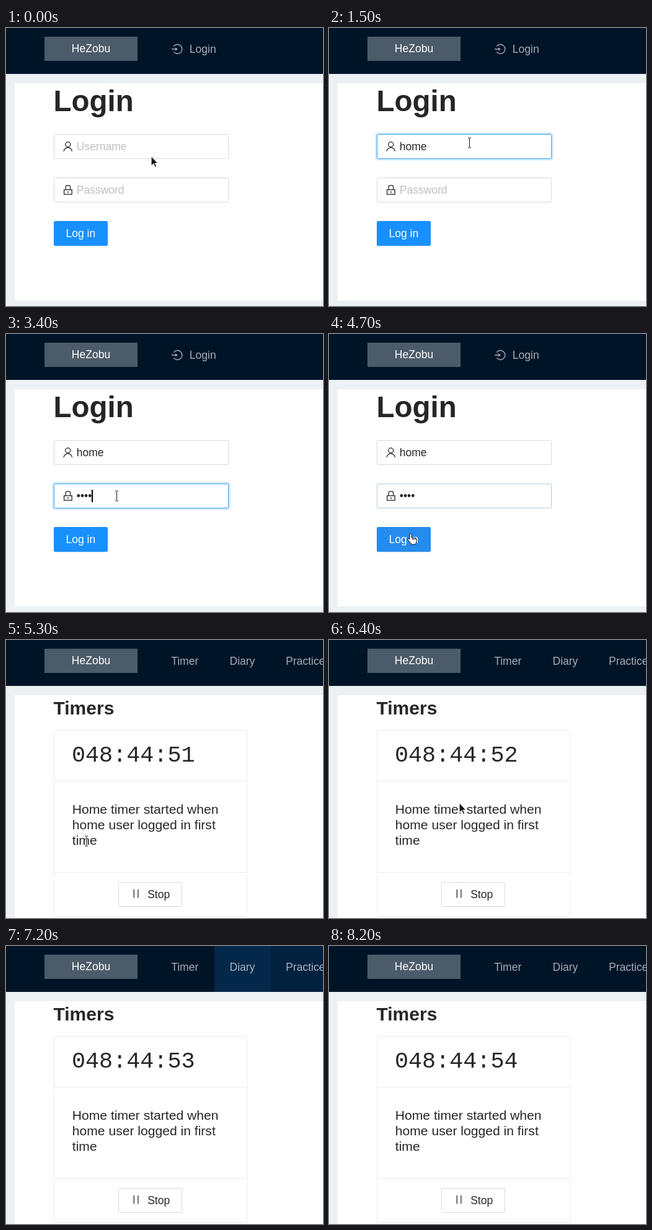
Write an HTML page that moves like this. It is 511x448 px and loops after 8300 ms.

```html
<!DOCTYPE html>
<html lang="en">
<head>
<meta charset="utf-8">
<title>Login and timers</title>
<style>
  html, body { margin: 0; height: 100%; overflow: hidden; }
  svg { display: block; width: 511px; height: 448px; background: #edf1f4; }
  text { font: 17.5px "Liberation Sans", Arial, sans-serif; fill: #262626; white-space: pre; }
  .menu { fill: #fff; fill-opacity: .65; }
  .light { fill: #fff; }
  .line { fill: none; stroke: #262626; stroke-width: 1.3; }
  .box { fill: #fff; stroke: #d9d9d9; }
  .card { fill: none; stroke: #ececec; }
  .glow { fill: none; stroke: #1890ff; stroke-width: 2.5; stroke-opacity: .22; }
  .beam { fill: none; stroke: #111; }
  .halo { fill: none; stroke: #fff; stroke-width: 3; stroke-opacity: .85; }
  #clock { font: 36.75px "Liberation Mono", "Courier New", monospace; }
  #note text { font-size: 21.1px; }
</style>
</head>
<body>
<svg viewBox="0 0 511 448">
  <rect width="511" height="74" fill="#001428"/>
  <rect id="diary" x="336" width="90" height="74" fill="#1890ff"/>
  <rect id="practice" x="426" width="85" height="74" fill="#1890ff"/>
  <rect x="62" y="14" width="150" height="39" fill="#4c5b69"/>
  <text class="light" x="137" y="39" text-anchor="middle">HeZobu</text>
  <rect id="page" x="14" y="89" width="497" height="350" fill="#fff"/>

  <g id="loginMenu">
    <path d="M270.3 29.6A7.5 7.5 0 1 1 270.3 38.4M267 34H274" fill="none" stroke="#a6adb4" stroke-width="1.4"/>
    <path d="M273 31.3L276.8 34L273 36.7Z" fill="#a6adb4"/>
    <text class="menu" x="295.8" y="40">Login</text>
  </g>

  <g id="loginPage">
    <text x="76.5" y="134" style="font-size:47.5px;font-weight:700">Login</text>
    <g id="user">
      <rect class="glow" x="75.75" y="169.75" width="284.5" height="42.5" rx="3.5"/>
      <rect class="box" x="77.5" y="171.5" width="281" height="39" rx="2"/>
      <circle class="line" cx="99.75" cy="187.7" r="4"/>
      <path class="line" d="M93 198.7A6.8 6.8 0 0 1 106.5 198.7"/>
      <text x="113.75" y="197"></text>
      <rect y="181" width="2" height="20"/>
    </g>
    <g id="pass">
      <rect class="glow" x="75.75" y="239.75" width="284.5" height="42.5" rx="3.5"/>
      <rect class="box" x="77.5" y="241.5" width="281" height="39" rx="2"/>
      <path class="line" d="M93.6 260.6H106.2V268.2H93.6ZM96.2 260.5V256Q96.2 253.6 98.6 253.6H101.2Q103.6 253.6 103.6 256V260.5M99.9 263V266"/>
      <text x="113.75" y="267"></text>
      <rect y="251" width="2" height="20"/>
    </g>
    <rect id="wave" fill="#1890ff"/>
    <rect x="77" y="313" width="87" height="40" rx="2.5" fill-opacity=".045"/>
    <rect id="button" x="77" y="311" width="87" height="40" rx="2.5"/>
    <text class="light" x="120.3" y="337" text-anchor="middle">Log in</text>
  </g>

  <g id="timerPage">
    <text class="menu" x="266.2" y="40">Timer</text>
    <text class="menu" x="360.5" y="40">Diary</text>
    <text class="menu" x="451" y="40">Practice</text>
    <text x="76.5" y="120" style="font-size:30px;font-weight:700">Timers</text>
    <rect class="card" x="77.5" y="145.5" width="311" height="300" rx="2"/>
    <path class="card" d="M78 227.5H388M78 374.5H388"/>
    <text id="clock" x="106" y="196"></text>
    <g id="note">
      <text x="106.8" y="280">Home timer started when</text>
      <text x="106.8" y="305">home user logged in first</text>
      <text x="106.8" y="330">time</text>
    </g>
    <rect class="box" x="181.5" y="390.5" width="102" height="39" rx="2"/>
    <path class="line" d="M206.3 402V415.5M212.9 402V415.5"/>
    <text x="228.2" y="416">Stop</text>
  </g>

  <g id="arrow">
    <path d="M0 0V16.5L3.8 13L6.4 18.8L9 17.6L6.4 12H11Z" fill="#111" stroke="#fff" stroke-width="1.2"/>
  </g>
  <g id="beam">
    <path class="halo" d="M-3 -8H3M0 -8V8M-3 8H3"/>
    <path class="beam" d="M-2.5 -8H-.5M.5 -8H2.5M0 -7.5V7.5M-2.5 8H-.5M.5 8H2.5"/>
  </g>
  <g id="hand">
    <path d="M4 10V2.2a1.5 1.5 0 0 1 3 0V7.2L13.2 8.4Q15.6 9 15.5 11Q15.3 14 14 16.4V18H7.2Q4.5 14.4 1.4 11Q0 8.8 2 8.2Q3 8.3 4 10ZM9.5 8V11M12.3 8.5V11" fill="#fff" stroke="#111"/>
  </g>
</svg>
<script>
const LOOP = 8300, STEP = 100;
const $ = id => document.getElementById(id);
const attr = (el, set) => { for (const k in set) el.setAttribute(k, set[k]); };
const show = (el, on) => { el.style.display = on ? "" : "none"; };
const mix = (a, b, p) => `rgb(${a.map((v, i) => Math.round(v + (b[i] - v) * p))})`;
const GREY = [217, 217, 217], FOCUS = [62, 163, 232];
const BLUE = [24, 144, 255], HOVER = [64, 169, 255], PRESSED = [9, 109, 217];

let t = 0;
const ease = (start, span = 300) => {
  const p = Math.min(1, Math.max(0, (t - start) / span));
  return p * p * (3 - 2 * p);
};
// Last entry whose start time has passed
const at = list => list.filter(e => e[0] <= t).pop();

const pointer = [
  [0, "arrow", 234, 206], [100, "beam", 230, 193], [200, "beam", 226.5, 185],
  [2300, "beam", 222, 197], [2400, "arrow", 201, 219], [2500, "beam", 182.5, 254],
  [2600, "beam", 178.5, 261], [4100, "beam", 173.5, 268], [4200, "arrow", 158, 273],
  [4400, "hand", 132, 318], [4500, "hand", 126, 321], [5300, "beam", 129.5, 324],
  [6300, "arrow", 152, 306], [6400, "arrow", 210, 262], [6500, "arrow", 275, 208],
  [6600, "arrow", 312, 175], [6900, "hand", 345, 46], [7000, "hand", 361, 22],
  [7100, "hand", 470, 8], [7200, "none", 0, 0]
];
const userKeys = [[0, ""], [1100, "h"], [1200, "hom"], [1400, "home"]];
const passKeys = [[0, ""], [3100, "••"], [3300, "•••"], [3400, "••••"]];

function field(id, hint, keys, border, glow, caretOn) {
  const [halo, box] = $(id).querySelectorAll("rect");
  const text = $(id).querySelector("text"), caret = $(id).lastElementChild;
  const typed = at(keys)[1];
  text.textContent = typed || hint;
  text.style.fill = typed ? "#262626" : "#bfbfbf";
  halo.style.opacity = glow;
  box.style.stroke = mix(GREY, FOCUS, border);
  show(caret, caretOn);
  if (caretOn) attr(caret, { x: Math.round(113.75 + (typed && text.getComputedTextLength())) });
}

function drawLogin() {
  field("user", "Username", userKeys, ease(50, 250) - ease(2500, 400),
    ease(450, 350) - ease(2500, 400), t >= 500 && t < 1500);
  field("pass", "Password", passKeys, ease(2450) - ease(4500),
    ease(2550, 350) - ease(4500, 200), t >= 2600 && t < 3800);

  const press = ease(4550) - ease(4800);
  const over = BLUE.map((v, i) => v + (HOVER[i] - v) * ease(4350, 250));
  $("button").style.fill = mix(over, PRESSED, press);

  const grow = 6 * ease(4750, 400);
  attr($("wave"), {
    x: 77 - grow, y: 311 - grow, width: 87 + 2 * grow, height: 40 + 2 * grow,
    rx: 2.5 + grow, "fill-opacity": .2 * (1 - ease(4750, 600))
  });
}

function draw() {
  const loggedIn = t >= 5300;
  show($("loginPage"), !loggedIn);
  show($("loginMenu"), t < 5200);
  show($("timerPage"), loggedIn);
  attr($("page"), { height: loggedIn ? 359 : 350 });
  if (loggedIn) $("clock").textContent = "048:44:" + (51 + Math.floor((t - 5200) / 1000));
  else drawLogin();

  const leave = t < 7100 ? 0 : 1 - ease(7050, 250);
  $("diary").style.opacity = t < 7100 ? ease(6870) : .45 * leave;
  $("practice").style.opacity = .3 * leave;

  const [, kind, x, y] = at(pointer);
  for (const id of ["arrow", "beam", "hand"]) {
    show($(id), id === kind);
    attr($(id), { transform: `translate(${x} ${y})` });
  }
}

const begin = performance.now();
function frame(now) {
  t = Math.floor(Math.max(0, now - begin) % LOOP / STEP) * STEP;
  draw();
  requestAnimationFrame(frame);
}
draw();
requestAnimationFrame(frame);
</script>
</body>
</html>
```
